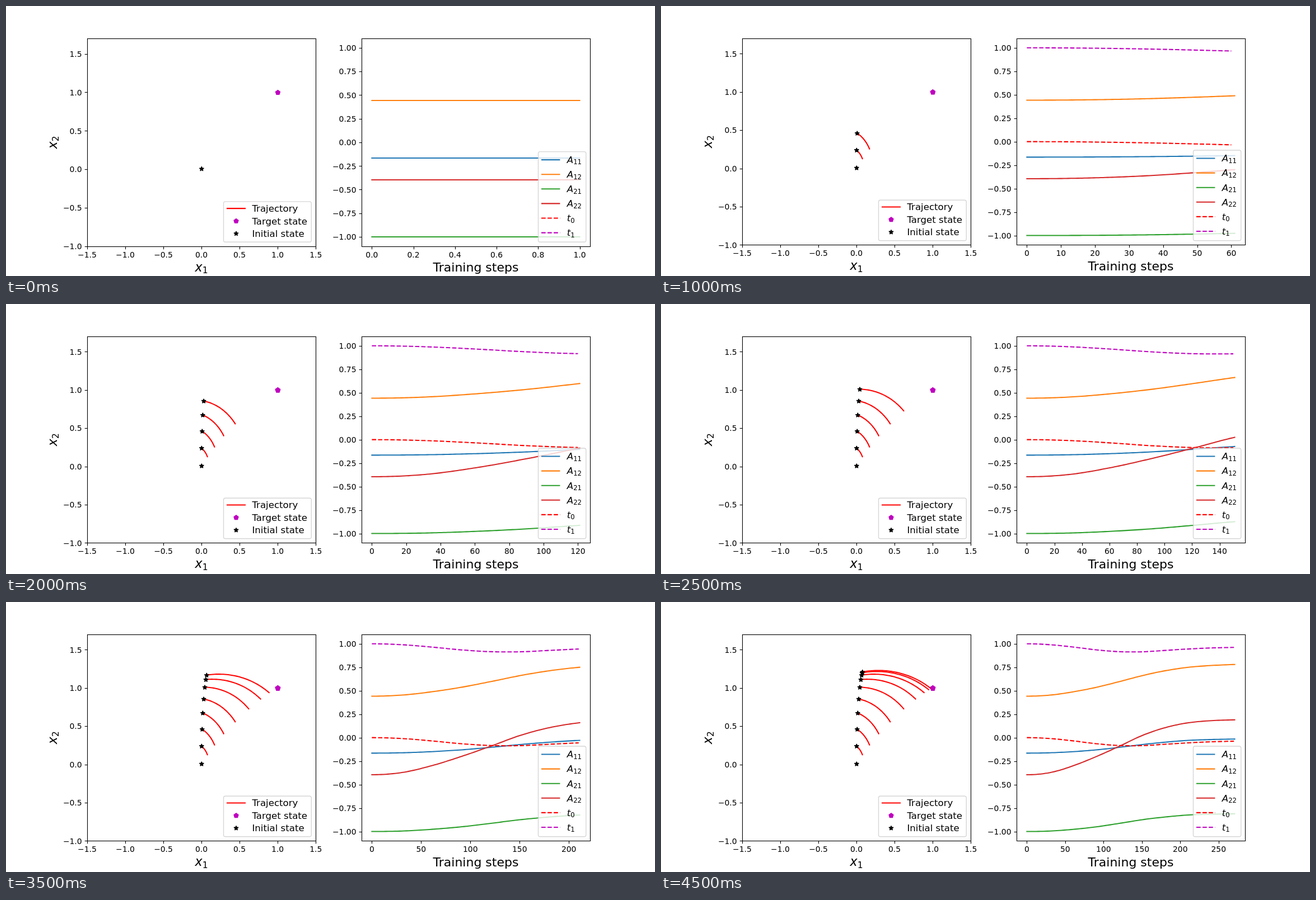
Write an HTML page that moves like this. It is 1159 px wide and 483 px high and loops after 5000 ms.

```html
<!DOCTYPE html>
<html lang="en">
<head>
<meta charset="utf-8">
<title>Training steps</title>
<style>
html, body { margin: 0; width: 100%; height: 100%; overflow: hidden; background: #fff; }
svg { display: block; width: 1159px; height: 483px; font-family: "DejaVu Sans", sans-serif; }
.i { font-style: oblique; }
</style>
</head>
<body>
<svg id="stage" viewBox="0 0 1159 483"></svg>
<script>
const STEP_MS = 500, COUNT = 10, TOP = 58;
const RED = '#ff0000', MAGENTA = '#bf00bf';

// Values at training steps 1, 31, 61, ... 271
const A11 = [-.165, -.161, -.149, -.130, -.103, -.073, -.048, -.029, -.020, -.015];
const A12 = [.442, .454, .489, .537, .598, .662, .714, .750, .769, .780];
const A21 = [-1, -.995, -.977, -.950, -.913, -.874, -.845, -.824, -.816, -.811];
const A22 = [-.395, -.371, -.298, -.200, -.090, .025, .108, .159, .181, .190];
const T0 = [0, -.010, -.035, -.065, -.084, -.085, -.070, -.055, -.044, -.038];
const T1 = T0.map(v => v + 1);
const START_X = [0, 0, .007, .015, .028, .042, .056, .066, .072, .077];
const START_Y = [.008, .240, .461, .673, .856, 1.010, 1.110, 1.168, 1.198, 1.210];

const SERIES = [
  { name: 'A', sub: '11', color: '#1f77b4', data: A11 },
  { name: 'A', sub: '12', color: '#ff7f0e', data: A12 },
  { name: 'A', sub: '21', color: '#2ca02c', data: A21 },
  { name: 'A', sub: '22', color: '#d62728', data: A22 },
  { name: 't', sub: '0', color: RED, data: T0, dashed: true },
  { name: 't', sub: '1', color: MAGENTA, data: T1, dashed: true }
];

const snap = v => Math.round(v) + .5;
const px = v => v.toFixed(2);

function text(x, y, size, body, anchor = 'start', extra = '') {
  return `<text x="${px(x)}" y="${px(y)}" font-size="${size}" text-anchor="${anchor}" ${extra}>${body}</text>`;
}

function math(name, sub, size) {
  return `<tspan class="i">${name}</tspan><tspan font-size="${size * .7}" dy="${size * .15}">${sub}</tspan>`;
}

function line(points, color, dashed) {
  const d = points.map(p => px(p[0]) + ',' + px(p[1])).join(' ');
  const style = dashed ? 'stroke-dasharray="7.7 3.33"' : 'stroke-linecap="square"';
  return `<polyline points="${d}" fill="none" stroke="${color}" stroke-width="2.08" stroke-linejoin="round" ${style}/>`;
}

function marker(x, y, color, inner) {
  const n = inner ? 10 : 5, pts = [];
  for (let i = 0; i < n; i++) {
    const r = 4.17 * (inner && i % 2 ? inner : 1), a = 2 * Math.PI * i / n;
    pts.push(px(x + r * Math.sin(a)) + ',' + px(y - r * Math.cos(a)));
  }
  const join = inner ? 'bevel' : 'miter';
  return `<polygon points="${pts.join(' ')}" fill="${color}" stroke="${color}" stroke-width="1.39" stroke-linejoin="${join}"/>`;
}
const star = (x, y) => marker(x, y, '#000', .382);
const pentagon = (x, y) => marker(x, y, MAGENTA);

function frame(x0, x1, bottom) {
  const l = snap(x0), t = snap(TOP);
  return `<rect x="${l}" y="${t}" width="${snap(x1) - l}" height="${snap(bottom) - t}" fill="none" stroke="#000" stroke-width="1.11"/>`;
}

function tick(x, y, dx, dy) {
  return `<path d="M${x} ${y}l${dx} ${dy}" stroke="#000" stroke-width="1.11"/>`;
}

const label = (v, digits) => v.toFixed(digits).replace('-', '\u2212');

function xTicks(from, to, step, digits, bottom, mapX) {
  let s = '';
  for (let i = 0; from + i * step <= to + 1e-6; i++) {
    const v = from + i * step, x = mapX(v);
    s += tick(snap(x), snap(bottom), 0, 4.86) + text(x, bottom + 20, 13.89, label(v, digits), 'middle');
  }
  return s;
}

function yTicks(from, to, step, digits, left, mapY) {
  let s = '';
  for (let v = from; v <= to + 1e-6; v += step) {
    const y = mapY(v);
    s += tick(snap(left), snap(y), -4.86, 0) + text(left - 9.3, y + 5.3, 13.89, label(v, digits), 'end');
  }
  return s;
}

function legendBox(x, y, w, h) {
  return `<rect x="${x}" y="${y}" width="${w}" height="${h}" rx="3.3" fill="#fff" stroke="#ccc" stroke-width="1.39" opacity=".8"/>`;
}

// Linear system x' = Ax followed for one unit of time
function trajectory(k) {
  const N = 40, h = 1 / N, path = [];
  const f = (x, y) => [A11[k] * x + A12[k] * y, A21[k] * x + A22[k] * y];
  let x = START_X[k], y = START_Y[k];
  for (let i = 0; i <= N; i++) {
    path.push([x, y]);
    const a = f(x, y), b = f(x + a[0] * h / 2, y + a[1] * h / 2);
    x += b[0] * h;
    y += b[1] * h;
  }
  return path;
}

// Smooth curve through the values
function sample(data, step) {
  const u = Math.max(0, (step - 1) / 30), last = data.length - 1;
  const i = Math.min(last - 1, Math.floor(u)), t = u - i;
  const slope = j => j === 0 ? 0 : j === last ? data[j] - data[j - 1] : (data[j + 1] - data[j - 1]) / 2;
  const t2 = t * t, t3 = t2 * t;
  return data[i] * (2 * t3 - 3 * t2 + 1) + slope(i) * (t3 - 2 * t2 + t) +
    data[i + 1] * (3 * t2 - 2 * t3) + slope(i + 1) * (t3 - t2);
}

function phasePlot(k, bottom) {
  const L = 144.9, R = 553.2;
  const X = v => L + (v + 1.5) * (R - L) / 3;
  const Y = v => bottom - (v + 1) * (bottom - TOP) / 2.7;
  let s = xTicks(-1.5, 1.5, .5, 1, bottom, X) + yTicks(-1, 1.5, .5, 1, L, Y);
  for (let j = 0; j <= k; j++) {
    s += line(trajectory(j).map(p => [X(p[0]), Y(p[1])]), RED);
    s += pentagon(X(1) + .3, Y(1) + .4) + star(X(START_X[j]) + .3, Y(START_Y[j]) + .4);
  }
  s += frame(L, R, bottom);
  s += text(349, bottom + 45, 22.2, math('x', 1, 22.2), 'middle');
  const mid = (TOP + bottom) / 2;
  s += text(91, mid, 22.2, math('x', 2, 22.2), 'middle', `transform="rotate(-90 91 ${mid})"`);

  const rows = [bottom - 67.8, bottom - 45.2, bottom - 22.7];
  s += legendBox(388.5, bottom - 80, 156.8, 72.4);
  s += line([[395, rows[0]], [427, rows[0]]], RED);
  s += pentagon(411, rows[1]) + star(411, rows[2]);
  ['Trajectory', 'Target state', 'Initial state'].forEach((name, i) => {
    s += text(439.4, rows[i] + 5.8, 16.6, name);
  });
  return s;
}

function tickStep(range) {
  const raw = range / 9, base = 10 ** Math.floor(Math.log10(raw));
  return base * [1, 2, 2.5, 5, 10].find(m => m * base >= raw);
}

function trainingPlot(k, bottom) {
  const L = 634.8, R = 1043.1, n = 1 + 30 * k;
  const X = v => L + (v / n + .05) * (R - L) / 1.1;
  const Y = v => bottom - (v + 1.1) * (bottom - TOP) / 2.2;
  let s = xTicks(0, n * 1.05, tickStep(n * 1.1), k ? 0 : 1, bottom, X) + yTicks(-1, 1, .25, 2, L, Y);
  for (const c of SERIES) {
    const end = c.dashed ? n - 1 : n;
    if (!end) continue;
    const pts = [], parts = k ? 90 : 1;
    for (let i = 0; i <= parts; i++) {
      const v = end * i / parts, y = Y(sample(c.data, v));
      pts.push([X(v), k ? y : Math.round(y)]);
    }
    s += line(pts, c.color, c.dashed);
  }
  s += frame(L, R, bottom);
  s += text(839, bottom + 45.2, 22, 'Training steps', 'middle');

  s += legendBox(950.5, bottom - 169.3, 85.3, 161.7);
  SERIES.forEach((c, i) => {
    const y = bottom - 154.8 + 26.1 * i, cap = c.dashed ? 0 : 1;
    s += line([[956 + cap, y], [989.4 - cap, y]], c.color, c.dashed);
    s += text(1001.8, y + 5.8, 16.67, math(c.name, c.sub, 16.67));
  });
  return s;
}

const stage = document.getElementById('stage');
let shown = -1;

function draw() {
  const k = Math.floor(performance.now() / STEP_MS) % COUNT;
  if (k !== shown) {
    const bottom = k ? 427.3 : 429.9;
    stage.innerHTML = phasePlot(k, bottom) + trainingPlot(k, bottom);
    shown = k;
  }
  requestAnimationFrame(draw);
}
draw();
</script>
</body>
</html>
```
